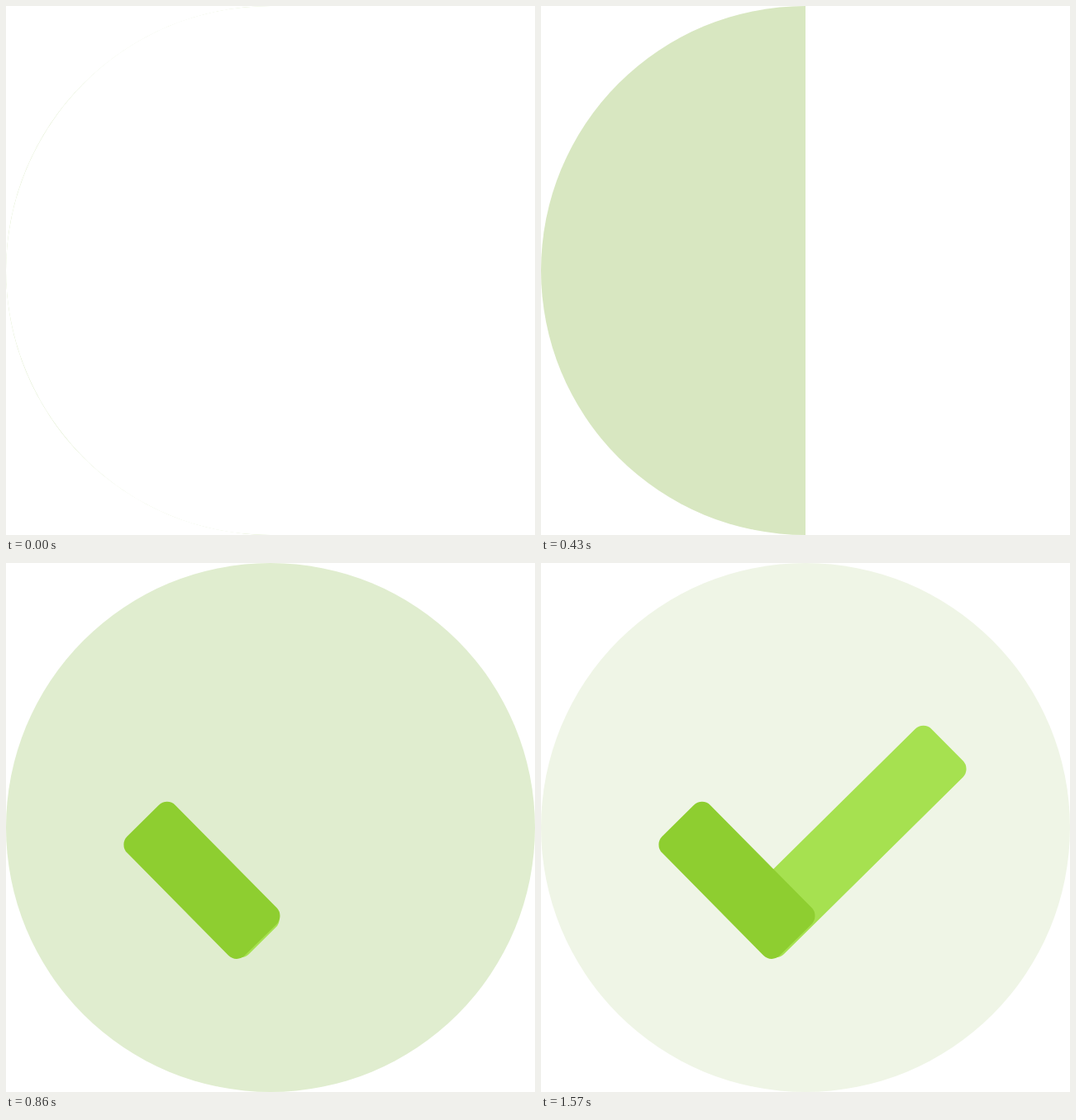
Animation of 640 by 640 pixels, one loop 2070 ms. Source, as an HTML page without scripts:

```html
<!DOCTYPE html>
<html lang="en">
<head>
<meta charset="utf-8">
<title>Check mark</title>
<style>
  html, body { margin: 0; width: 100%; height: 100%; overflow: hidden; background: #fff; }
  svg { display: block; width: 100vw; height: 100vh; }

  /* 29 steps per loop, each 3.448 % */
  .disc, .cut, .bulge, .short, .long { animation: 2070ms step-end -5ms infinite; }
  .disc { animation-name: fade; fill: currentColor; }
  .cut { animation-name: cut; fill: #fff; }
  .bulge { animation-name: bulge; }
  .short { animation-name: short; fill: #8ece30; }
  .long { animation-name: long; fill: #a6e150; }

  @keyframes fade {
    0% { color: #d0e3b3; animation-timing-function: steps(4); }
    13.79% { color: #d5e6bc; animation-timing-function: steps(3); }
    24.14% { color: #dae8c3; animation-timing-function: steps(5); }
    41.38% { color: #e0edcf; animation-timing-function: steps(4); }
    55.17% { color: #e8f2db; animation-timing-function: steps(6); }
    75.86%, 100% { color: #eff5e6; }
  }

  /* white half shrinks to the middle, then the green half swells out */
  @keyframes cut {
    0% { transform: scaleX(1); }
    3.45% { transform: scaleX(.994); }
    6.9% { transform: scaleX(.966); }
    10.34% { transform: scaleX(.903); }
    13.79% { transform: scaleX(.79); }
    17.24% { transform: scaleX(.58); }
    20.69%, 100% { transform: scaleX(0); }
  }
  @keyframes bulge {
    0% { transform: scaleX(0); }
    24.14% { transform: scaleX(.6875); }
    27.59% { transform: scaleX(.86); }
    31.03% { transform: scaleX(.937); }
    34.48% { transform: scaleX(.975); }
    37.93% { transform: scaleX(.994); }
    41.38%, 100% { transform: scaleX(1); }
  }

  @keyframes short {
    0% { width: 0; }
    31.03% { width: 82px; }
    34.48% { width: 131px; }
    37.93% { width: 180px; }
    41.38%, 100% { width: 202.5px; }
  }
  /* grows past its length, then settles back */
  @keyframes long {
    0% { width: 0; }
    41.38% { width: 74px; }
    44.83% { width: 107.6px; }
    48.28% { width: 187.7px; }
    51.72% { width: 283.3px; }
    55.17% { width: 364px; }
    58.62% { width: 397px; }
    62.07% { width: 390.3px; }
    65.52% { width: 374.3px; }
    68.97% { width: 355.2px; }
    72.41% { width: 339.2px; }
    75.86%, 100% { width: 332.5px; }
  }
</style>
</head>
<body>
<svg viewBox="0 0 640 640">
  <g class="disc" transform="translate(320 320)">
    <path d="M0-320A320 320 0 0 0 0 320z"/>
    <path class="cut" d="M0-320C-183-320-320-170-320 0C-320 170-183 320 0 320z"/>
    <path class="bulge" d="M0-320A320 320 0 0 1 0 320z"/>
  </g>
  <g transform="translate(255 453.8) rotate(-44.65)">
    <rect class="long" y="-41" width="0" height="82" rx="14"/>
  </g>
  <g transform="translate(165.8 311.8) rotate(45.35)">
    <rect class="short" y="-41" width="0" height="82" rx="14"/>
  </g>
</svg>
</body>
</html>
```
